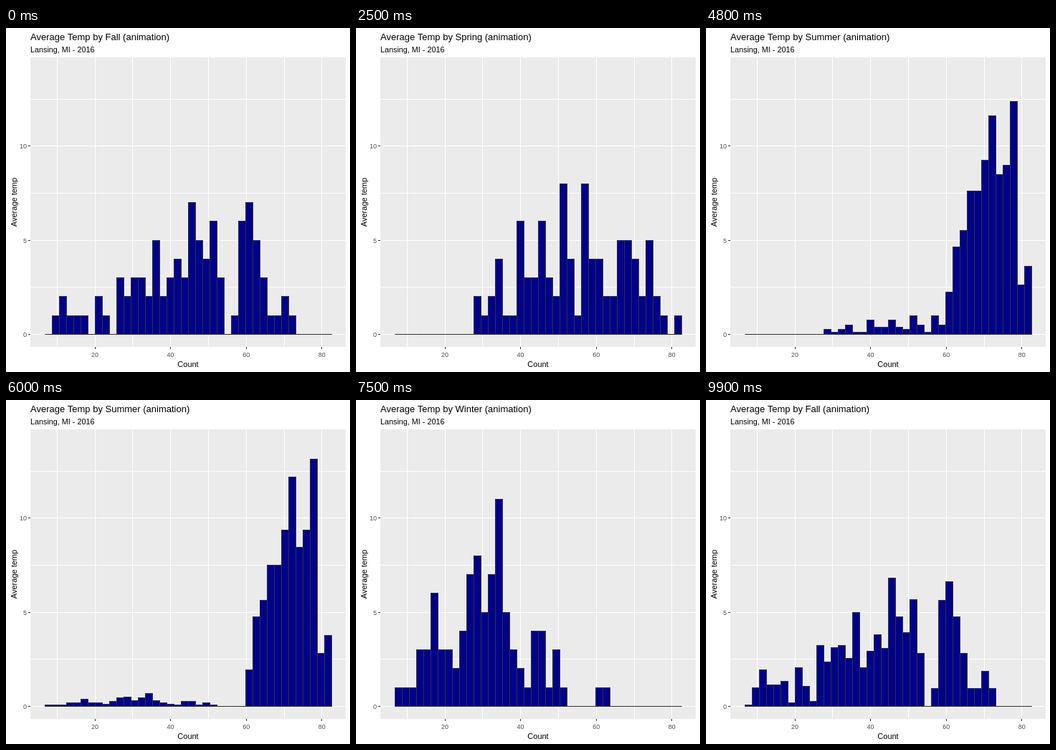
These frames come from a looping animation (480 px wide and 480 px high, 10 s). An HTML page with a canvas:

```html
<!DOCTYPE html>
<html lang="en">
<head>
<meta charset="utf-8">
<title>Average temperature by season</title>
<style>
  html, body { margin: 0; width: 100%; height: 100%; overflow: hidden; background: #fff; }
  canvas { display: block; width: 480px; height: 480px; }
</style>
</head>
<body>
<canvas id="chart" width="480" height="480"></canvas>
<script>
const ctx = document.getElementById('chart').getContext('2d');
const BINS = 40, STEP_MS = 100, STEPS = 100;
const PANEL = { left: 34, top: 41, right: 474, bottom: 445 };

// Daily counts per temperature bin, beginning at the bin `first`.
const seasons = [
  { name: 'Fall', first: 1, counts: [
    1, 2, 1, 1, 1, 0, 2, 1, 0, 3, 2, 3, 3, 2, 5, 2, 3,
    4, 3, 7, 5, 4, 6, 3, 0, 1, 6, 7, 5, 3, 1, 1, 2, 1] },
  { name: 'Spring', first: 11, counts: [
    2, 1, 2, 4, 1, 1, 6, 3, 3, 6, 3, 2, 8, 4, 1,
    8, 4, 4, 2, 2, 5, 5, 4, 2, 5, 2, 1, 0, 1] },
  { name: 'Summer', first: 28, counts: [2, 5, 6, 8, 8, 10, 13, 9, 10, 14, 3, 4] },
  { name: 'Winter', first: 0, counts: [
    1, 1, 1, 3, 3, 6, 3, 3, 2, 4, 7, 8, 5, 7, 11,
    5, 3, 2, 1, 4, 4, 1, 3, 1, 0, 0, 0, 0, 1, 1] }
];

// Last resting step before each transition, and its length in steps.
const transitions = [
  { start: 8, length: 17 },
  { start: 34, length: 16 },
  { start: 59, length: 16 },
  { start: 84, length: 16 }
];

const countAt = (season, bin) => season.counts[bin - season.first] || 0;
const xTemp = temp => 18.4 + 5.28 * temp;
const xBin = bin => Math.floor(54.3 + 10.01 * bin);
const yCount = count => Math.floor(427.4 - 26.26 * count);

function fill(color, x, y, w, h) {
  ctx.fillStyle = color;
  ctx.fillRect(x, y, w, h);
}

function text(label, x, y, size, align = 'left', color = '#000') {
  ctx.font = `${size}px "Liberation Sans", Arial, sans-serif`;
  ctx.textAlign = align;
  ctx.fillStyle = color;
  ctx.fillText(label, x, y);
}

function drawAxes() {
  const { left, top, right, bottom } = PANEL;
  fill('#fff', 0, 0, 480, 480);
  fill('#ebebeb', left, top, right - left, bottom - top);

  for (let temp = 10; temp <= 80; temp += 10) {
    const x = Math.floor(xTemp(temp));
    fill('#fff', x, top, 1, bottom - top);
    if (temp % 20 === 0) {
      fill('#333', x, bottom, 1, 3);
      text(temp, xTemp(temp), 459, 9, 'center', '#4d4d4d');
    }
  }
  for (let count = 0; count <= 12.5; count += 2.5) {
    const y = yCount(count);
    fill('#fff', left, y, right - left, 1);
    if (count % 5 === 0) {
      fill('#333', left - 3, y, 3, 1);
      text(count, 29, y + 4, 9, 'right', '#4d4d4d');
    }
  }

  text('Count', 254, 473, 11, 'center');
  ctx.save();
  ctx.translate(15, 243);
  ctx.rotate(-Math.PI / 2);
  text('Average temp', 0, 0, 11, 'center');
  ctx.restore();
}

function drawBars(from, to, progress) {
  ctx.strokeStyle = '#333';
  ctx.lineWidth = 1;
  const base = yCount(0);
  for (let bin = 0; bin < BINS; bin++) {
    const a = countAt(from, bin), b = countAt(to, bin);
    const x = xBin(bin), w = xBin(bin + 1) - x;
    const y = yCount(a + (b - a) * progress);
    fill('#00008b', x, y, w, base - y);
    ctx.strokeRect(x + 0.5, y + 0.5, w, base - y);
  }
}

function draw(now) {
  const step = Math.floor(now / STEP_MS) % STEPS;
  let index = transitions.findIndex(t => step <= t.start + t.length);
  if (step === 0) index = 0;
  const { start, length } = transitions[index];
  const done = Math.max(0, step - start);
  const from = seasons[index], to = seasons[(index + 1) % seasons.length];
  const nearest = done > Math.ceil(length / 2) ? to : from;

  drawAxes();
  drawBars(from, to, done / length);
  text(`Average Temp by ${nearest.name} (animation)`, 34, 17, 13);
  text('Lansing, MI - 2016', 34, 34, 10.8);
}

const began = performance.now();
function tick() {
  draw(performance.now() - began);
  requestAnimationFrame(tick);
}
tick();
</script>
</body>
</html>
```
